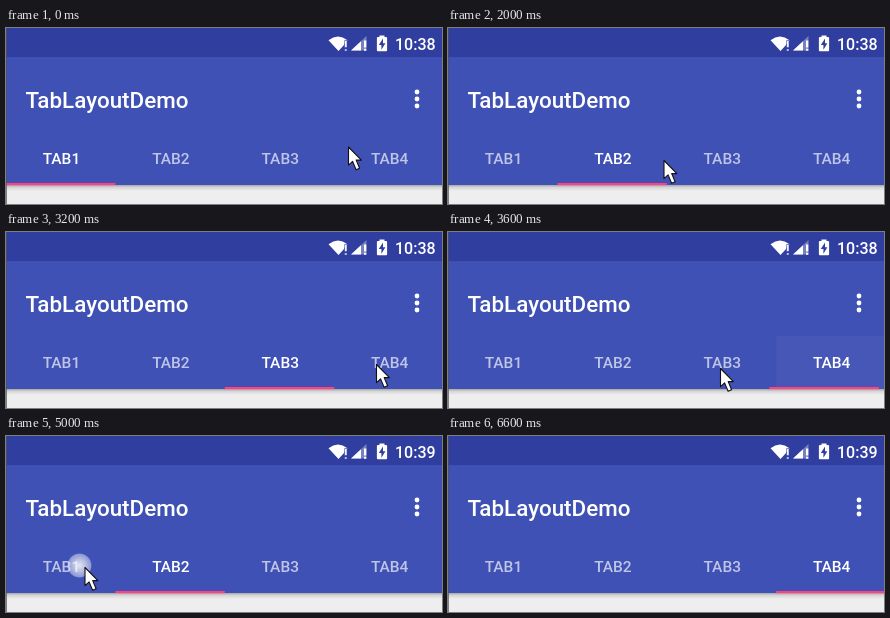
An HTML page that plays this animation: 436 px wide and 176 px high, repeating every 8000 ms.

```html
<!DOCTYPE html>
<html lang="en">
<head>
<meta charset="utf-8">
<title>Tab layout</title>
<style>
  html, body { margin: 0; width: 100%; height: 100%; overflow: hidden; background: #eee; }
  svg { display: block; width: 436px; height: 176px; }
  text { font-family: Roboto, "Noto Sans", sans-serif; font-weight: 500; fill: #fff; }
  .tab { font-size: 15.5px; text-anchor: middle; }
</style>
</head>
<body>
<svg viewBox="0 0 436 176">
  <defs>
    <linearGradient id="shade" x2="0" y2="1">
      <stop offset="0" stop-color="#000" stop-opacity=".3"/>
      <stop offset=".4" stop-color="#000" stop-opacity=".1"/>
      <stop offset="1" stop-color="#000" stop-opacity="0"/>
    </linearGradient>
    <radialGradient id="glow">
      <stop offset="0" stop-color="#fff" stop-opacity=".85"/>
      <stop offset=".45" stop-color="#fff" stop-opacity=".65"/>
      <stop offset=".9" stop-color="#dfe4f8" stop-opacity=".5"/>
      <stop offset="1" stop-color="#dfe4f8" stop-opacity="0"/>
    </radialGradient>
  </defs>

  <rect width="436" height="176" fill="#eee"/>
  <rect y="157" width="436" height="6" fill="url(#shade)"/>
  <rect width="436" height="157" fill="#3f51b5"/>
  <rect width="436" height="29" fill="#303f9f"/>

  <!-- status icons -->
  <g fill="#fff">
    <path d="M322.5 12.2Q332 4.8 341.5 12.2L338 16.6V17L332.5 23Z"/>
    <path d="M338.6 12.5h2.4v7h-2.4zM338.6 21h2.4v2h-2.4z" stroke="#303f9f" stroke-width=".6"/>
    <path d="M345 22.5L360.5 8V22.5Z" opacity=".35"/>
    <path d="M345 22.5L355 13.2V22.5Z"/>
    <path d="M358 12.5h2.3v7h-2.3zM358 20.7h2.3v2h-2.3z"/>
    <path d="M373.5 9V7.5h5V9h1.6q1 0 1 1v12.3q0 1-1 1h-8.2q-1 0-1-1V10q0-1 1-1z"/>
    <path d="M377 10.5L372.8 17H375.4V21.8L379.4 15.2H377Z" fill="#303f9f"/>
  </g>
  <text id="clock" x="389" y="22" font-size="16"></text>

  <text x="19.6" y="80" font-size="22.4">TabLayoutDemo</text>
  <g fill="#fff">
    <circle cx="411" cy="64" r="2.4"/>
    <circle cx="411" cy="71" r="2.4"/>
    <circle cx="411" cy="78" r="2.4"/>
  </g>

  <g id="tabs"></g>
  <rect id="bar" y="155" height="2.2" fill="#ff4081"/>
  <rect width="1" height="176" fill="#50535f" opacity=".7"/>

  <circle id="touch" r="12.5" fill="url(#glow)"/>
  <path id="cursor" d="M.5 .5V18.6L4.6 14.9L8.1 23.2L11.6 21.7L8.2 13.6H13.4Z"
        fill="#fff" stroke="#111" stroke-width="1.1" stroke-linejoin="round"/>
</svg>

<script>
const LOOP = 8000, STEP = 200, SLIDE = 300, TAB_W = 109.4, OFFSET = 26;
const $ = id => document.getElementById(id);

// pointer: [time, x, y]
const path = [
  [0, 342, 118.5], [200, 362, 100], [400, 318, 59], [800, 123, 130],
  [1000, 150, 149], [1200, 180, 127], [1800, 181, 128], [2200, 250, 136],
  [2400, 282, 132], [2800, 283, 132], [3000, 310, 134], [3200, 370, 132],
  [3400, 378, 131], [3600, 272, 136], [3800, 215, 136], [4000, 174, 132],
  [4400, 174, 132], [4800, 78, 131], [5200, 79, 131], [5400, 110, 134],
  [5800, 387, 128], [6000, 387, 128], [6200, 391, 133], [6400, 420, 144]
];
const touches = [1400, 2600, 3400, 4000, 4800, 5000, 6000];
// selections: [time, tab]
const picks = [[-1000, 0], [1500, 1], [2600, 2], [3390, 3], [4100, 1], [5150, 0], [5870, 3]];

const make = (name, attrs) => {
  const el = document.createElementNS("http://www.w3.org/2000/svg", name);
  for (const k in attrs) el.setAttribute(k, attrs[k]);
  $("tabs").append(el);
  return el;
};
const tabs = [0, 1, 2, 3].map(i => {
  const ripple = make("rect", { x: i * TAB_W, y: 104, width: TAB_W, height: 53, fill: "#fff" });
  const label = make("text", { class: "tab", x: (i + .5) * TAB_W + .8, y: 136 });
  label.textContent = "TAB" + (i + 1);
  return { ripple, label };
});

const mix = (a, b, k) => a + (b - a) * k;

// cubic-bezier(.4, 0, .2, 1)
function ease(x) {
  let lo = 0, hi = 1, u = .5;
  for (let i = 0; i < 20; i++) {
    u = (lo + hi) / 2;
    const bx = 1.2 * u * (1 - u) ** 2 + .6 * u * u * (1 - u) + u ** 3;
    if (bx < x) lo = u; else hi = u;
  }
  return u * u * (3 - 2 * u);
}

function barEdges(prev, next, k) {
  const left = next * TAB_W, right = left + TAB_W;
  let a = prev * TAB_W, b = a + TAB_W;
  // a jump past a neighbour grows in from just outside the new tab
  if (Math.abs(next - prev) > 1) a = b = next < prev ? right + OFFSET : left - OFFSET;
  return [mix(a, left, k), mix(b, right, k)];
}

function pointer(t) {
  const i = path.findIndex(p => p[0] >= t);
  if (i < 0) return null;
  if (i === 0) return path[0].slice(1);
  const [t0, x0, y0] = path[i - 1], [t1, x1, y1] = path[i];
  const k = (t - t0) / (t1 - t0);
  return [mix(x0, x1, k), mix(y0, y1, k)];
}

function draw(t) {
  const n = picks.filter(p => p[0] <= t).length - 1;
  const [since, active] = picks[n];
  const age = t - since;
  const prev = n ? picks[n - 1][1] : active;
  const [l, r] = barEdges(prev, active, ease(Math.min(1, age / SLIDE)));
  $("bar").setAttribute("x", l);
  $("bar").setAttribute("width", Math.max(0, r - l));

  tabs.forEach(({ ripple, label }, i) => {
    const on = i === active;
    label.style.fill = on ? "#fff" : "#bfc5e6";
    ripple.setAttribute("opacity", on && age > 0 ? Math.max(0, .06 * (1 - age / 500)) : 0);
  });

  $("clock").textContent = t < 4200 ? "10:38" : "10:39";

  const p = pointer(t);
  $("cursor").style.display = p ? "" : "none";
  $("touch").style.display = touches.includes(t) ? "" : "none";
  if (p) {
    $("cursor").setAttribute("transform", `translate(${p})`);
    $("touch").setAttribute("transform", `translate(${p[0] - 5} ${p[1] - 1.5})`);
  }
}

const start = performance.now();
function tick() {
  const t = (performance.now() - start) % LOOP;
  draw(Math.floor(t / STEP) * STEP);
  requestAnimationFrame(tick);
}
tick();
</script>
</body>
</html>
```
